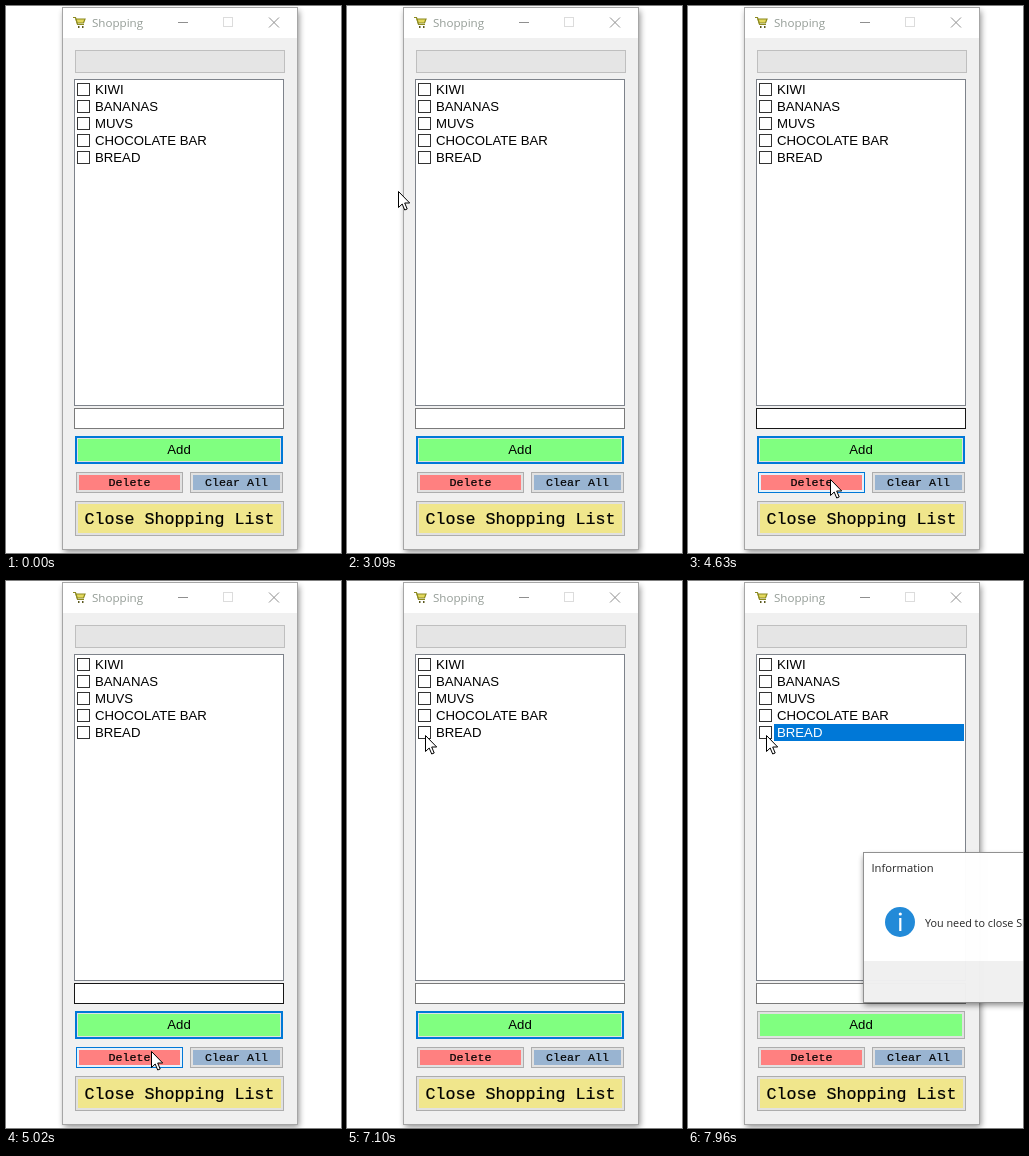
Write an HTML page that moves like this. It is 335 px wide and 547 px high and loops after 8000 ms.

```html
<!DOCTYPE html>
<html lang="en">
<head>
<meta charset="utf-8">
<title>Shopping</title>
<style>
html, body { margin: 0; width: 100%; height: 100%; overflow: hidden; background: #fff; }
svg { display: block; width: 335px; height: 547px; }
text { font-family: "Liberation Sans", Arial, sans-serif; font-size: 13.2px; fill: #000; white-space: pre; }
.ui { font-family: "Open Sans", "Noto Sans", sans-serif; }
.mono { font-family: "Liberation Mono", monospace; stroke: #000; stroke-width: .2px; }
.mid { text-anchor: middle; }
.crisp { shape-rendering: crispEdges; }
#title { font-size: 11.6px; fill: #949c96; }
#caption { font-size: 11.2px; fill: #222; }
#message { font-size: 10.8px; fill: #222; }
#dialog { transform-origin: 335px 346px; }
.active #title { fill: #000; }
.active .controls { stroke: #000; }
.active #shadow { opacity: .75; }
</style>
</head>
<body>
<svg id="stage" viewBox="0 0 335 547">
  <defs>
    <filter id="blur" x="-20%" y="-20%" width="140%" height="140%"><feGaussianBlur stdDeviation="3"/></filter>
  </defs>

  <rect id="shadow" x="58" y="5" width="235" height="541" opacity=".45" filter="url(#blur)"/>
  <rect x="56.5" y="1.5" width="235" height="542" fill="#f0f0f0" stroke="#a6a6a6" class="crisp"/>
  <rect x="57" y="2" width="234" height="30" fill="#fff"/>

  <g fill="none" stroke="#8c8a20" stroke-width="1.2">
    <path d="M67 11.500H69.500L71.500 18.500H78"/>
    <path d="M70 13H79L77.500 17H71.200Z" fill="#e3d85c"/>
    <path d="M72 21h1.500M76 21h1.500" stroke="#5d5a20" stroke-width="2"/>
  </g>
  <text id="title" class="ui" x="86" y="21">Shopping</text>
  <g class="controls" fill="none" stroke="#8f8f8f">
    <path d="M172 16.500H182"/>
    <rect x="217.500" y="11.500" width="9" height="9" stroke="#dcdcdc"/>
    <path d="M263 11.500L273 21.500M273 11.500L263 21.500"/>
  </g>

  <g class="crisp">
    <rect x="69.500" y="44.500" width="209" height="22" fill="#e5e5e5" stroke="#bfbfbf"/>
    <rect x="68.500" y="73.500" width="209" height="326" fill="#fff" stroke="#7e838b"/>
    <rect id="field" x="68.500" y="402.500" width="209" height="20" fill="#fff"/>
  </g>
  <rect id="mark" x="86" y="143" width="190" height="17" fill="#0078d7"/>
  <g id="list"></g>
  <g id="buttons"></g>

  <g id="dots" class="crisp" fill="#000">
    <path d="M1 199h1v1h-1zM1 201h1v1h-1zM1 207h1v1h-1zM8 208h1v1h-1zM10 208h1v1h-1zM1 209h1v1h-1zM1 215h1v1h-1zM1 217h1v1h-1z"/>
  </g>

  <g id="dialog">
    <rect x="176" y="275" width="260" height="149" opacity=".5" filter="url(#blur)"/>
    <rect x="175.500" y="271.500" width="260" height="150" fill="#fff" stroke="#8f8f8f"/>
    <rect x="176" y="380" width="260" height="41" fill="#f0f0f0"/>
    <text id="caption" class="ui" x="183.500" y="291">Information</text>
    <circle cx="212" cy="341" r="15" fill="#1e88d8"/>
    <g fill="#fff"><circle cx="212.300" cy="333" r="1.600"/><rect x="211.200" y="337" width="2.200" height="13"/></g>
    <text id="message" class="ui" x="237" y="346">You need to close Shopping List</text>
  </g>

  <path id="cursor" d="M.5.5V16.500L4.200 13L6.700 19L9.200 18L6.700 12H11.700Z" fill="#fff" stroke="#000"/>
</svg>

<script>
const $ = id => document.getElementById(id);
const LOOP = 8000, START = 990, TICK = 77.3;

const items = ["KIWI", "BANANAS", "MUVS", "CHOCOLATE BAR", "BREAD"];
$("list").innerHTML = items.map((name, i) => {
  const y = 77 + i * 17;
  return `<rect class="crisp" x="71.5" y="${y + .5}" width="12" height="12" fill="#fff" stroke="#333"/>
    <text id="item${i}" x="89" y="${y + 11}">${name}</text>`;
}).join("");

function button(id, label, x, y, w, h, fill, cls, size) {
  const baseline = y + h / 2 + size * .34;
  return `<g><rect id="${id}" class="crisp" x="${x + .5}" y="${y + .5}" width="${w - 1}" height="${h - 1}" fill="#e1e1e1" stroke="#adadad"/>
    <rect x="${x + 3}" y="${y + 3}" width="${w - 6}" height="${h - 6}" fill="${fill}"/>
    <text class="mid ${cls}" x="${x + w / 2}" y="${baseline}" style="font-size:${size}px">${label}</text></g>`;
}
$("buttons").innerHTML =
  button("add", "Add", 69, 430, 208, 28, "#80ff80", "", 13.2) +
  `<rect id="focus" class="crisp" x="70" y="431" width="206" height="26" fill="none" stroke="#0078d7" stroke-width="2"/>` +
  button("delete", "Delete", 70, 466, 107, 21, "#ff8080", "mono", 11.67) +
  button("clear", "Clear All", 184, 466, 93, 21, "#99b4d1", "mono", 11.67) +
  button("close", "Close Shopping List", 69, 495, 209, 35, "#f0e68c", "mono", 16.67);

// Pointer route: tick, x, y
const route = [
  [0, 40, 523], [1, 25, 470], [2, 32, 417], [3, 32, 417], [5, 0, 318],
  [16, 22, 200], [17, 41, 202], [20, 41, 202], [22, 29, 203], [23, 29, 203],
  [28, 57, 180], [29, 57, 180], [35, 152, 389], [38, 153, 389], [40, 148, 358],
  [41, 148, 358], [47, 142, 473], [49, 144, 510], [52, 145, 470], [57, 102, 221],
  [60, 80, 143], [63, 75, 154], [64, 75, 154], [65, 78, 154]
];

function pointer(k) {
  const i = route.findIndex(p => p[0] > k);
  if (i < 0) return route[route.length - 1].slice(1);
  if (i === 0) return route[0].slice(1);
  const [ka, xa, ya] = route[i - 1], [kb, xb, yb] = route[i];
  const f = (k - ka) / (kb - ka);
  return [Math.round(xa + (xb - xa) * f), Math.round(ya + (yb - ya) * f)];
}

const show = (id, on) => $(id).setAttribute("visibility", on ? "visible" : "hidden");
const paint = (id, attr, value) => $(id).setAttribute(attr, value);

function draw(t) {
  const k = Math.floor((t - START) / TICK);
  const [x, y] = pointer(k);
  show("cursor", (k >= 0 && k < 6) || k >= 16);
  paint("cursor", "transform", `translate(${x} ${y})`);
  show("dots", k === 15);

  const over = k >= 16 && x >= 70 && x < 177 && y >= 466 && y < 487;
  paint("delete", "stroke", over ? "#0078d7" : "#adadad");
  paint("delete", "fill", over ? "#e5f1fb" : "#e1e1e1");
  paint("field", "stroke", k >= 44 && k < 60 ? "#171717" : "#7a7a7a");

  const picked = k >= 80;
  show("mark", picked);
  show("focus", !picked);
  $("item4").style.fill = picked ? "#fff" : "#000";
  $("stage").classList.toggle("active", picked && k < 86);

  const open = Math.max(0, Math.min(1, (k - 85) / 5));
  show("dialog", open > 0);
  $("dialog").style.opacity = .98 * open;
  $("dialog").style.transform = `scale(${.93 + .07 * open})`;
}

function frame(now) {
  draw(now % LOOP);
  requestAnimationFrame(frame);
}
draw(0);
requestAnimationFrame(frame);
</script>
</body>
</html>
```
